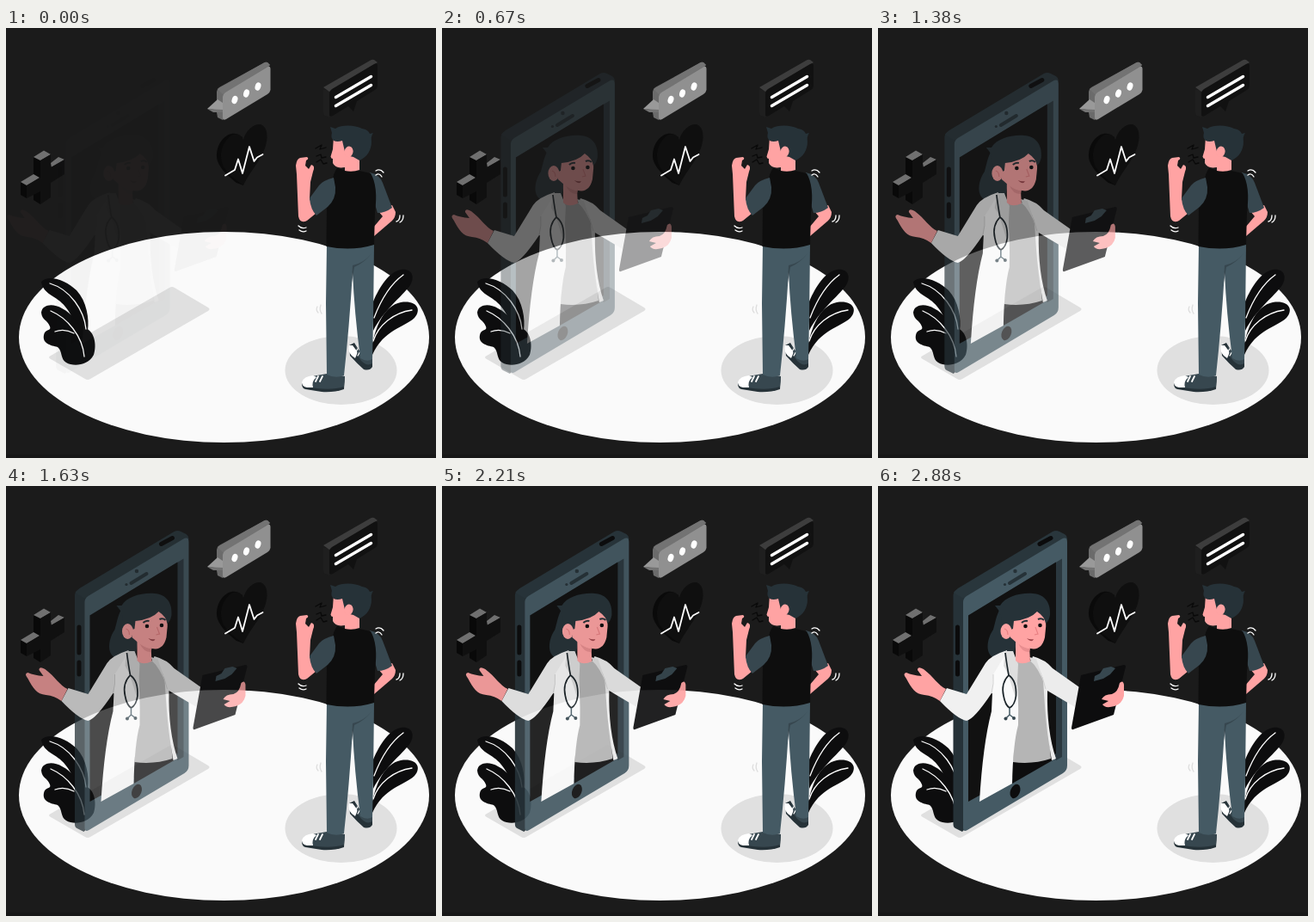
An HTML page for the animation above (2.93 s loop, 500 px wide and 500 px high).

```html
<!DOCTYPE html>
<html lang="en">
<head>
<meta charset="utf-8">
<title>Online doctor</title>
<style>
  html, body { margin: 0; width: 100%; height: 100%; overflow: hidden; background: #1b1b1b; }
  svg { display: block; width: 100vw; height: 100vh; }
  .line { fill: none; stroke: #fff; stroke-width: 1.3; stroke-linecap: round; stroke-linejoin: round; }
  .ink { fill: #0d0d0e; }
  .skin { fill: #ffa3a3; }
  .hair { fill: #263238; }
  .slate { fill: #37474f; }
  .steel { fill: #455a64; }
  .shade { fill: #e0e0e0; }
</style>
</head>
<body>
<svg viewBox="0 0 500 500">
  <rect width="500" height="500" fill="#1b1b1b"/>
  <rect y="496" width="500" height="4" fill="#171717"/>
  <ellipse cx="253.5" cy="359.5" rx="238.5" ry="122.5" fill="#fafafa"/>
  <path class="shade" d="M52 381 190 302Q193 300 196 302L235 325Q238 327 235 329L98 408Q95 410 92 408L52 385Q48 383 52 381Z"/>
  <ellipse class="shade" cx="389.5" cy="398" rx="65" ry="40"/>

  <!-- medical cross -->
  <path fill="#090909" d="M17 179 24 183V198L17 194ZM32 150 40 154V205L32 200Z"/>
  <path fill="#707070" d="M17 179 32 170 39 174 24 183ZM32 150 44 142.500 52 147 40 154ZM52 157 61 150 68 153 53 162Z"/>
  <path fill="#101010" d="M24 183 40 174V154L52 147V162L68 153V170L52 180V197L40 205V190L24 198Z"/>

  <!-- grey bubble -->
  <path fill="#6b6b6b" d="M245 74Q245 71 248 69L299 41Q302 39 304 40L307 43 252 107 246 104 245 98Z"/>
  <path fill="#737373" d="M246 71 299 41Q302 39 304 40L307 43 252 77Z"/>
  <path fill="#909090" d="M252 80Q252 77 255 75L303 46Q307 43 307.500 47V72Q307 75 304 77L256 106Q252 108 252 104Z"/>
  <path fill="#999" d="M234 94 246 83 252 87V96Z"/>
  <path fill="#737373" d="M234 94 252 95V98L241 98Z"/>
  <g fill="#fff">
    <ellipse cx="266" cy="83.500" rx="3.300" ry="4.700" transform="rotate(18 266 83.500)"/>
    <ellipse cx="279.500" cy="76" rx="3.300" ry="4.700" transform="rotate(18 279.500 76)"/>
    <ellipse cx="293" cy="68" rx="3.300" ry="4.700" transform="rotate(18 293 68)"/>
  </g>

  <!-- heart -->
  <path fill="#0a0a0a" d="M268 180 276 183 275 127 270 124C259 119 246 131 245 147C244 160 258 172 268 180Z"/>
  <path fill="#0f0f0f" d="M276 183C264 174 250 165 250 149C250 134 262 120 271 124Q275 126 276 130C279 119 287 112 295 112C301 113 304 119 303.500 128C302 149 285 164 276 183Z"/>
  <path class="line" style="stroke-width:1.800" d="M255 171.500 266 165 270 152.500 275 169 283 138 288.500 155 292 150.500 298.500 147"/>

  <!-- dark bubble -->
  <path fill="#1f1f1f" d="M369 71 376 73V104L371 102Q369 101 369 98Z"/>
  <path fill="#3d3d3d" d="M369 69 423 38Q426 36 428 37L432 40 376 74Z"/>
  <path fill="#111" d="M376 76Q376 73 379 71L428 42Q432 40 432 44V67Q432 70 429 72L408 85 404 97 398 91 380 102Q376 104 376 100Z"/>
  <path d="M383.500 80.500 424.500 56.500M383.500 90.500 424.500 66.500" stroke="#fff" stroke-width="3.500" stroke-linecap="round"/>

  <!-- plants -->
  <g class="ink">
    <path d="M427 318C435 300 445 284 459 281C472 279 476 289 470 299C460 313 439 328 427 352Z"/>
    <path d="M424 378C429 346 440 323 459 319C477 316 484 327 475 337C462 349 440 350 426 380Z"/>
    <path d="M41 295C49 286 70 293 82 305C94 318 97 338 95 352L83 354C77 332 69 321 56 313C46 307 42 302 41 295Z"/>
    <path d="M41 331C42 321 55 320 65 326C78 332 82 344 89 348C103 350 106 368 102 380C95 393 78 394 70 389C63 385 66 376 60 371C52 369 42 367 44 357C46 349 53 353 51 347C48 339 42 340 41 331Z"/>
  </g>
  <path class="line" d="M428 337C436 316 448 297 462 287M427 364C433 345 451 331 472 328M51 297C75 304 91 329 93 350M52 329C71 337 89 358 91 382M57 353Q68 349 79 355"/>

  <!-- cough -->
  <path class="line" style="stroke:#090909;stroke-width:1.300" d="M360 140 367 136 365 141 372 139M361 149 366 147 367 151 372 150M361 156 366 153 369 158 373 157"/>

  <!-- patient: shoes, legs, arms, torso, head -->
  <path class="hair" d="M399 369 405 366 413 379 426 386V394Q423 399 416 397 408 390 400 381Z"/>
  <path fill="#fff" d="M399 369Q397 376 402 381L406 384 409 377 403 369Z"/>
  <path class="slate" d="M406 369 412 377 426 384 426 390Q418 395 410 383Z"/>
  <path class="line" d="M406 378 409 373M409 381 412 376"/>
  <path class="hair" d="M344 413 373 403 394 405 393 420Q381 424 367 423L348 420Q344 419 344 413Z"/>
  <path class="slate" d="M356 405 373 402 394 405 393 417Q378 422 354 418Z"/>
  <path fill="#fff" d="M357 404Q346 405 344 412 344 417 350 418L357 418Q355 411 361 406Z"/>
  <path class="line" style="stroke-width:1.800" d="M360 411 363 405M365 411 368 405"/>
  <path class="steel" d="M373 252H428L427 340 426 385Q420 389 412 384 405 330 403 284 399 350 393 404 383 408 373 403L372 320Z"/>
  <path class="slate" d="M402 296 403 276Q417 273 425 262 418 272 405 278Z"/>
  <path class="skin" d="M449 206 453 214Q453 220 449 224L428 242 427 232 438 219 433 213Z"/>
  <path class="slate" d="M423 168Q434 170 438 180L449 209Q441 215 432 215L426 195Z"/>
  <path fill="#0e0e0e" d="M385 163Q398 168 411 166L424 169Q433 184 429 214L428 252Q402 260 372.500 254L373 205 374 190 380 176Q381 168 385 163Z"/>
  <path class="skin" d="M338 170 337 160Q338 152 342 151L350 150Q353 152 349 154L348 160 352 164 355 159Q360 160 357 167L354 179 353 199 361 215 350 224Q342 228 340 219Z"/>
  <path class="slate" d="M381 174Q369 177 364 183L353 198Q354 211 361 218L374 208Q384 199 383 185Z"/>
  <path class="skin" d="M381 126 380 141 377.500 149.500Q378 152 380 152L380 157Q383 164 394 162V166Q403 168 411 165V145L400 126Z"/>
  <path class="hair" d="M377 115 383 117C391 112 406 113 414 117Q421 118 423 123L427 122Q424 126 425 132C425 142 420 150 411 154L404 150 395 148 391 131Q385 133 381 131 377 127 379 122Z"/>
  <ellipse class="skin" cx="398.500" cy="144" rx="5" ry="6.500" transform="rotate(12 398.500 144)"/>
  <path class="line" d="M430 166Q435 163 439 168M430 171Q434 168 437 173M454 225Q458 224 458 218M458 226Q462 224 462 218M340 230Q344 234 349 232M341 235Q345 238 349 236"/>
  <path class="line" style="stroke:#ddd" d="M362 324Q360 328 363 331M366 322Q364 328 367 332"/>

  <!-- phone and doctor -->
  <g id="call">
    <path class="hair" d="M87.500 127Q87.500 123 92 121L104 128V396L98 402 90 398Q87.500 397 87.500 393Z"/>
    <path fill="#29363c" d="M88 124Q89 122 93 119L203 53Q207 51 211 53L217 56Q220 58 220 62L105 131 98 130Z"/>
    <path class="steel" d="M99 135Q99 131 103 128L213 62Q220 58 220 65V325Q220 331 215 334L104 400Q99 403 99 397Z"/>
    <path fill="#2b383f" d="M105 150.500 214 84.500V315L207 319Z"/>
    <path fill="#111" d="M105 150.500 207 88.500V311L105 367Z"/>
    <ellipse class="ink" cx="159.500" cy="355" rx="5.500" ry="8.500" transform="rotate(22 159.500 355)"/>
    <g fill="none" stroke-linecap="round" stroke="#0b0b0c" stroke-width="5">
      <path d="M92.500 164V194M92.500 205V219M188 67.500 201 60.500"/>
      <path d="M153 113 171 102" stroke="#263238" stroke-width="4"/>
    </g>
    <circle class="hair" cx="159.500" cy="99" r="2.200"/>
    <circle class="hair" cx="147.500" cy="114.500" r="1.600"/>

    <path class="hair" d="M150 135C138 142 137 158 134 167C127 177 125 192 132 198C138 204 149 195 158 196L166 160Z"/>
    <path class="ink" d="M157 318 203 314 203 319 156 346Z"/>
    <path fill="#b5b5b5" d="M160 202 179 203Q193 215 194 235L201 317Q180 324 157 321Z"/>
    <path fill="#ececec" d="M180 198Q195 202 203 212L237 236 229 257 197 238Q196 285 207 317L202 319Q196 285 194 255L192 225Q188 210 178 204Z"/>
    <path fill="#f0f0f0" d="M150 191Q131 197 125 206L103 242 80 235 72 250Q92 271 103 273 112 271 132 241L150 245Z"/>
    <path fill="#fafafa" d="M150 193 134 219 132 262Q122 300 118 367L156 346Q157 300 163 278 164 240 160 206Z"/>
    <path fill="#dedede" d="M148 192 157 192 163 207 161 250 151 218 146 209ZM176 199 184 201 194 231Q186 211 178 204Z"/>
    <path d="M132 241Q135 230 134 219M195 236 191 222" fill="none" stroke="#d2d2d2"/>
    <path class="skin" d="M160 175V203Q166 209 177 204L176 186Z"/>
    <path fill="#e98e90" d="M163 183Q170 189 177 189L176 193Q167 193 163 183Z"/>
    <path class="skin" d="M154 158 164 145 183 139 195 150Q196 163 194 176 191 189 181 189.500 170 189 161 182L154 176Z"/>
    <path class="hair" d="M136 139 142 139C148 129 164 124 180 125C195 126 201 137 200 150Q199 157 195 160 194 152 185 146 177 155 158 157L157 166 150 169Q142 162 143 150 140 143 136 139Z"/>
    <ellipse class="skin" cx="149" cy="169" rx="6.500" ry="9"/>
    <path d="M147 166Q151 167 151 173M183 164 186 172 182 173" fill="none" stroke="#e98083" stroke-width="1.200"/>
    <circle class="ink" cx="171.500" cy="163" r="2.300"/>
    <circle class="ink" cx="188.500" cy="162" r="2.300"/>
    <path d="M167 159Q170 156 174 157M186 155Q190 153 193 156" fill="none" stroke="#263238" stroke-width="2"/>
    <path fill="#a3474d" d="M173 177Q177 179 181 178 179 183 173 177Z"/>

    <path d="M148 194Q150 209 152 220M152 220C146 226 144 235 146 244Q148 255 153 258 159 255 160.500 244C161 233 158 224 152 220" fill="none" stroke="#1b2429" stroke-width="1.700"/>
    <path d="M153 258V266L149 270M153 266 157 269" fill="none" stroke="#455a64" stroke-width="1.500"/>
    <circle class="slate" cx="148.500" cy="270.500" r="2"/>
    <circle class="slate" cx="158" cy="270" r="2"/>

    <path class="skin" d="M79 236C70 232 65 222 53 213Q46 209 46 214L51 221Q40 220 33 217 28 218 33 224C39 235 43 242 54 243Q64 244 72 250Z"/>
    <path class="ink" d="M236 220 286 208Q288 208 288 210L274 266 227 283Q225 284 225 281Z"/>
    <path class="slate" d="M252 221 258 218 262 212 271 210 276 212 270 219 262 224 251 227Z"/>
    <path class="skin" d="M260 248Q263 242 272 242 279 240 281 229 285 225 286 231L286 244Q284 253 275 256 264 259 261 254L268 250Z"/>
  </g>
</svg>
<script>
  const LOOP = 2930, LEAD = 40, SHIFT = 30;
  const call = document.getElementById('call');

  // cubic-bezier(0, 0, .58, 1), solved by bisection
  function easeOut(u) {
    let lo = 0, hi = 1;
    for (let i = 0; i < 24; i++) {
      const s = (lo + hi) / 2;
      if (1.74 * s * s - 0.74 * s ** 3 < u) lo = s; else hi = s;
    }
    return 3 * lo * lo - 2 * lo ** 3;
  }

  const start = performance.now();
  function draw() {
    const t = (performance.now() - start) % LOOP;
    const p = easeOut((t + LEAD) / (LOOP + LEAD));
    call.setAttribute('transform', `translate(${SHIFT * (p - 1)} 0)`);
    call.setAttribute('opacity', p);
    requestAnimationFrame(draw);
  }
  draw();
</script>
</body>
</html>
```
